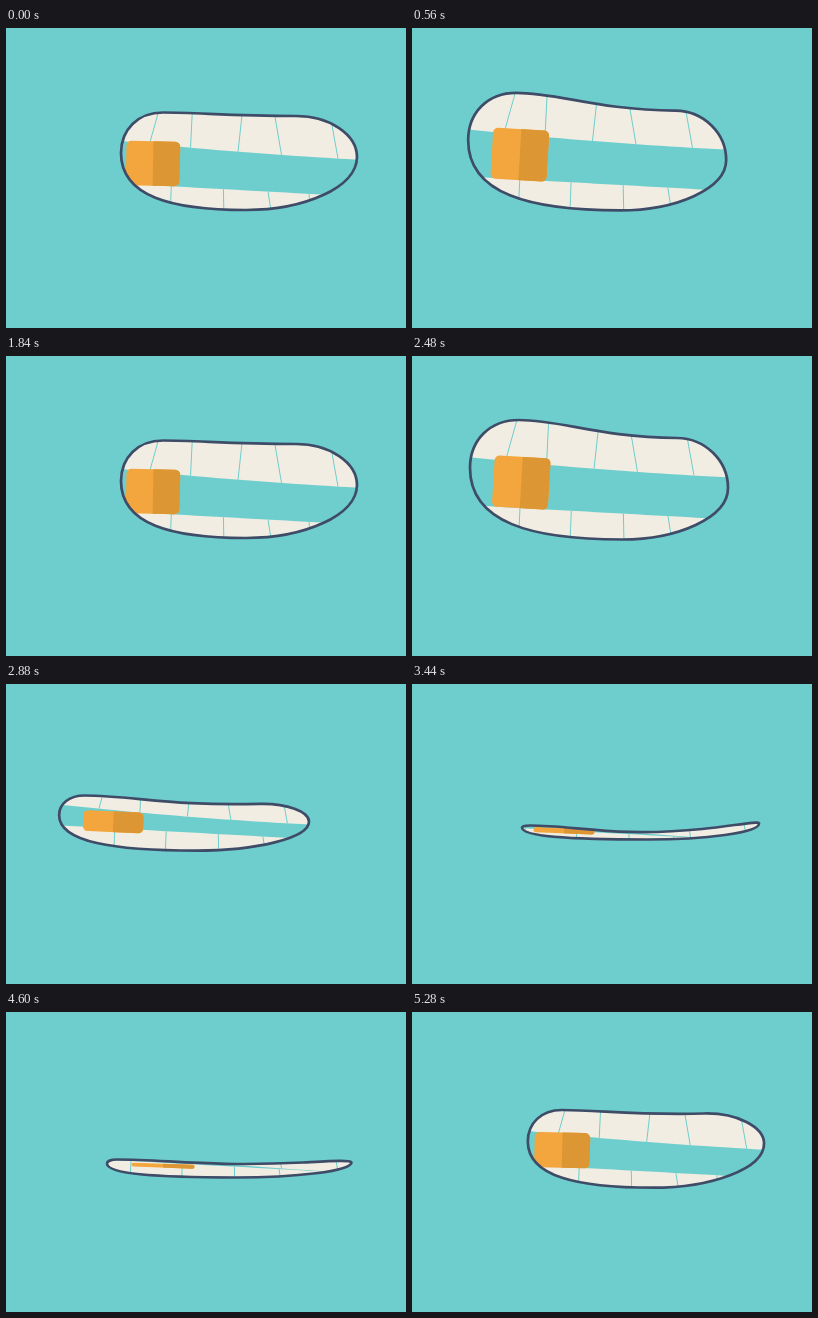
These frames come from a looping animation (400 px wide and 300 px high, 5.32 s). An HTML page with a canvas:

```html
<!DOCTYPE html>
<html lang="en">
<head>
<meta charset="utf-8">
<title>Chewing mouth</title>
<style>
  html, body { margin: 0; width: 100%; height: 100%; overflow: hidden; background: #6dcecd; }
  canvas { display: block; }
</style>
</head>
<body>
<canvas id="stage" width="400" height="300"></canvas>
<script>
const ctx = document.getElementById('stage').getContext('2d');
const LOOP = 5320, STEP = 40;
const CYAN = '#6dcecd', TOOTH = '#f2ede2', LINE = '#3f4c68', LIGHT = '#f3a63e', DARK = '#dd9634';

// Five points of the lips, offsets of both rows of teeth, and the block of food.
// turn holds the slope of the upper lip at its shoulder and the angle of the block.
const openRight = {
  left: [115, 125], top: [157, 84.5], shoulder: [290, 88], right: [351, 129], chin: [240, 182],
  upper: [0, 0], lower: [0, 0], block: [147, 135.5], size: [53.8, 44.5], turn: [0, 0.02]
};
const openLeft = {
  left: [58, 112], top: [107, 64], shoulder: [265, 82], right: [316, 132], chin: [210, 183.5],
  upper: [-50, -11], lower: [-6, -3.5], block: [109.3, 126.5], size: [56, 51.5], turn: [0.01, 0.06]
};
const shut = {
  left: [94, 152], top: [104, 148], shoulder: [290, 151], right: [338.5, 151], chin: [222, 166],
  upper: [-7, 30], lower: [4, -6], block: [150, 154.2], size: [63, 3.8], turn: [-0.05, 0.035]
};
const shutRight = {
  left: [110, 143.5], top: [118, 141.5], shoulder: [290, 145], right: [347, 139.5], chin: [235, 155.5],
  upper: [3, 26], lower: [-0.5, -11], block: [152, 146.7], size: [61, 5.3], turn: [-0.1, 0.04]
};

const PARTS = Object.keys(openRight);
const build = f => Object.fromEntries(PARTS.map(n => [n, [f(n, 0), f(n, 1)]]));
const mix = (a, b, k) => build((n, i) => a[n][i] + (b[n][i] - a[n][i]) * k);
const shift = (p, ...by) => build((n, i) => p[n][i] + (n === 'size' || n === 'turn' ? 0 : by[i]));

const opening = shift(mix(openRight, shutRight, 0.237), 2, 0);
const wide = shift(mix(openRight, shutRight, 0.45), 6, 0);
const closing = shift(mix(openLeft, shut, 0.48), -35, -8);
closing.lower[0] = -8; // the lower jaw hardly slides
const nearlyShut = mix(closing, shut, 0.7);
const shutDrift = shift(shut, 7, -0.5);

// Between the two open poses the chin dips a little.
function swing(k, dip) {
  const p = mix(openRight, openLeft, k);
  p.chin[1] += dip;
  return p;
}
const bite = t => [
  [t, openLeft], [t + 320, closing], [t + 480, nearlyShut], [t + 520, shut], [t + 600, shutDrift]
];

const keys = [
  [0, openRight], [170, swing(0.55, 4)], [340, swing(0.92, 1.5)],
  ...bite(520),
  [1460, shutRight], [1680, wide], [1840, openRight],
  [2040, swing(0.55, 6)], [2240, swing(0.92, 2)],
  ...bite(2480),
  [3440, shutRight], [3575, opening], [3610, openRight],
  [3730, swing(0.55, 2)], [3850, swing(0.92, 1)],
  ...bite(4000),
  [5080, shutRight], [5280, opening]
];

function keyAt(i) {
  const n = keys.length, lap = Math.floor(i / n), [t, p] = keys[i - lap * n];
  return { t: t + lap * LOOP, p };
}

// Monotone cubic interpolation: smooth, with no overshoot past a key.
const slopeAt = (s, r) => s * r > 0 ? 2 * s * r / (s + r) : 0;
function poseAt(time) {
  let k = 0;
  while (k + 1 < keys.length && keys[k + 1][0] <= time) k++;
  const [a, b, c, d] = [k - 1, k, k + 1, k + 2].map(keyAt);
  const h = c.t - b.t, u = (time - b.t) / h, w = 1 - u;
  return build((n, i) => {
    const [va, vb, vc, vd] = [a, b, c, d].map(key => key.p[n][i]);
    const s = (vc - vb) / h;
    const m0 = slopeAt((vb - va) / (b.t - a.t), s);
    const m1 = slopeAt(s, (vd - vc) / (d.t - c.t));
    return vb * w * w * (1 + 2 * u) + vc * u * u * (3 - 2 * u) + h * u * w * (m0 * w - m1 * u);
  });
}

function lips({ left: [lx, ly], top: [tx, ty], shoulder: [sx, sy], right: [rx, ry], chin: [cx, cy], turn: [slope] }) {
  const path = new Path2D();
  const inward = 0.5 * (sx - tx), outward = 0.55 * (rx - sx);
  path.moveTo(lx, ly);
  path.bezierCurveTo(lx, ly - 0.58 * (ly - ty), tx - 0.6 * (tx - lx), ty, tx, ty);
  path.bezierCurveTo(tx + 0.27 * (sx - tx), ty, sx - inward, sy - slope * inward, sx, sy);
  path.bezierCurveTo(sx + outward, sy + slope * outward, rx, ry - 0.55 * Math.max(5, Math.abs(ry - sy)), rx, ry);
  path.bezierCurveTo(rx, ry + 0.58 * (cy - ry), cx + 0.52 * (rx - cx), cy, cx, cy);
  path.bezierCurveTo(cx - 0.6 * (cx - lx), cy, lx, ly + 0.76 * (cy - ly), lx, ly);
  path.closePath();
  return path;
}

// Each crack has the x where it leaves the biting edge and its lean.
const upperRow = {
  edge: x => 113.3 + 0.104 * (x - 118) - 0.00011 * (x - 118) ** 2,
  depth: -60,
  cracks: [[143.5, 0.28], [184.5, 0.05], [232, 0.11], [275.5, -0.17], [332, -0.18]]
};
const lowerRow = {
  edge: x => 152.5 + 0.055 * (x - 60),
  depth: 60,
  cracks: [[114, -0.05], [165.3, -0.04], [217.4, 0.02], [262, 0.16], [303, 0.08]]
};

function drawTeeth({ edge, depth, cracks }, offset) {
  ctx.save();
  ctx.translate(...offset);
  ctx.beginPath();
  for (let x = 40; x <= 440; x += 10) ctx.lineTo(x, edge(x));
  ctx.lineTo(440, edge(440) + depth);
  ctx.lineTo(40, edge(40) + depth);
  ctx.fillStyle = TOOTH;
  ctx.fill();
  ctx.beginPath();
  for (const [x, lean] of cracks) {
    ctx.moveTo(x, edge(x));
    ctx.lineTo(x + lean * Math.abs(depth), edge(x) + depth);
  }
  ctx.strokeStyle = CYAN;
  ctx.lineWidth = 1;
  ctx.stroke();
  ctx.restore();
}

function drawBlock({ block, size: [w, h], turn: [, angle] }) {
  ctx.save();
  ctx.translate(...block);
  ctx.rotate(angle);
  ctx.beginPath();
  ctx.roundRect(-w / 2, -h / 2, w, h, Math.min(5, h / 2));
  ctx.fillStyle = LIGHT;
  ctx.fill();
  ctx.clip();
  ctx.fillStyle = DARK;
  ctx.fillRect(0, -h, w, 2 * h);
  ctx.restore();
}

function draw(time) {
  const pose = poseAt(time), mouth = lips(pose);
  ctx.fillStyle = CYAN;
  ctx.fillRect(0, 0, 400, 300);

  ctx.save();
  ctx.clip(mouth);
  drawTeeth(upperRow, pose.upper);
  drawTeeth(lowerRow, pose.lower);
  drawBlock(pose);
  ctx.restore();

  ctx.strokeStyle = LINE;
  ctx.lineWidth = 2.7;
  ctx.lineJoin = 'round';
  ctx.stroke(mouth);
}

const start = performance.now();
function tick() {
  const time = (performance.now() - start) % LOOP;
  draw(Math.floor(time / STEP) * STEP);
  requestAnimationFrame(tick);
}
tick();
</script>
</body>
</html>
```
